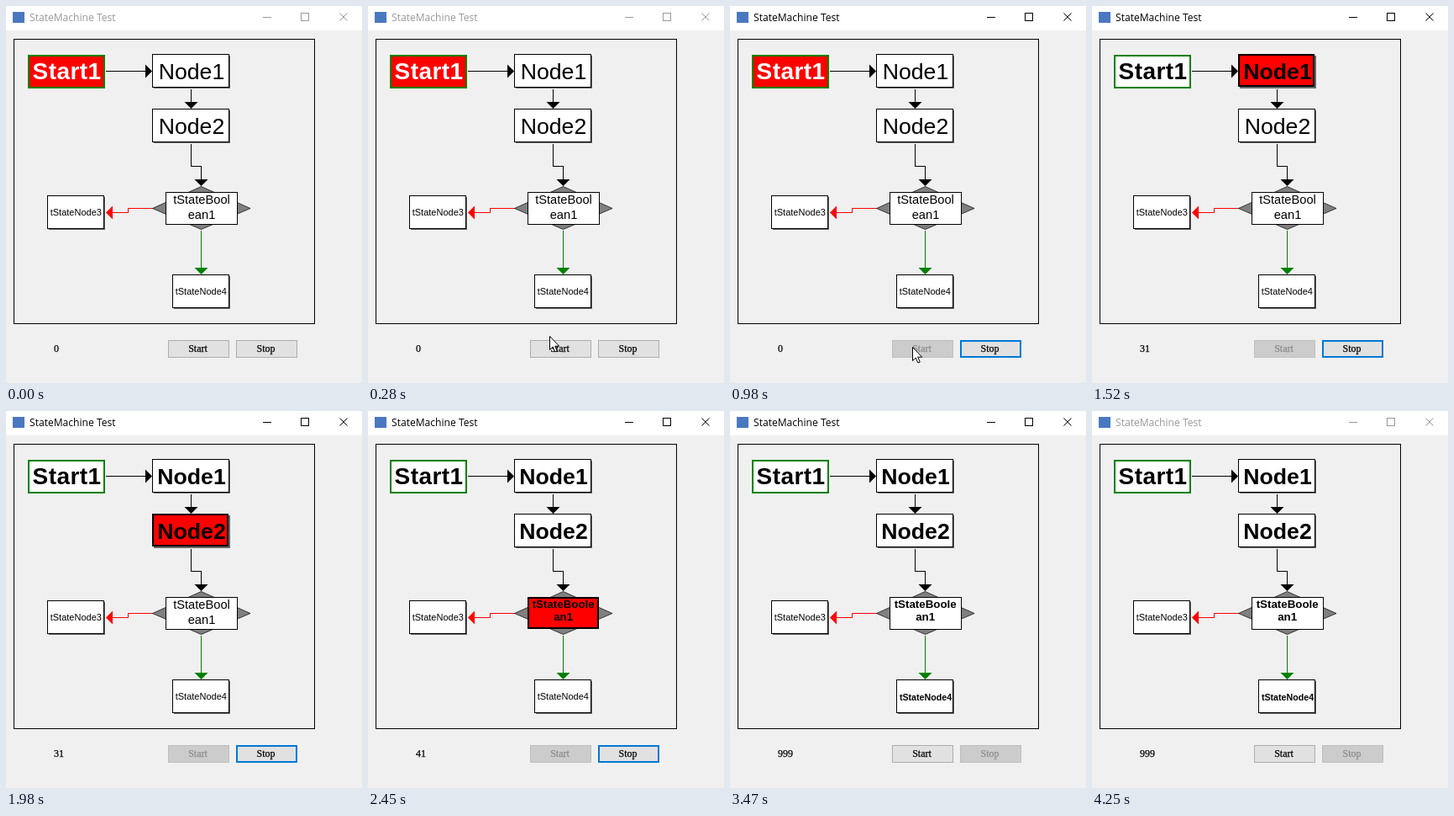
An HTML page that plays this animation: 424x448 px, repeating every 4320 ms.

```html
<!DOCTYPE html>
<html lang="en">
<head>
<meta charset="utf-8">
<title>StateMachine Test</title>
<style>
  html, body { margin: 0; width: 100%; height: 100%; overflow: hidden; background: #f0f0f0; }
  svg { display: block; width: 424px; height: 448px; }
  text { font-family: "Liberation Sans", Arial, sans-serif; text-anchor: middle; }
  .caption { font: 12.1px "Open Sans", "Noto Sans", sans-serif; text-anchor: start; }
  .form { font: 12px "Liberation Serif", "Times New Roman", serif; stroke-width: .25; }
  .start { text-anchor: start; }
</style>
</head>
<body>
<svg id="stage" viewBox="0 0 424 448"></svg>
<script>
const LOOP = 4320;
const stage = document.getElementById('stage');

function add(tag, attrs, content = '') {
  const el = document.createElementNS('http://www.w3.org/2000/svg', tag);
  set(el, attrs);
  el.textContent = content;
  return stage.appendChild(el);
}

function set(el, attrs) {
  for (const key in attrs) el.setAttribute(key, attrs[key]);
}

// Rectangle whose border lies inside the given outer bounds.
function frame(x, y, width, height, border) {
  return { x: x + border / 2, y: y + border / 2, width: width - border, height: height - border, 'stroke-width': border };
}

function arrow(line, head, color) {
  add('path', { d: line, fill: 'none', stroke: color, 'shape-rendering': 'crispEdges' });
  add('path', { d: head, fill: color });
}

function makeNode(x, y, width, height, plain, bold, shadow = true) {
  if (shadow) add('rect', { x: x + 2, y: y + 2, width: width - 1, height: height - 1, fill: '#696969' });
  const box = add('rect', { stroke: '#000' });
  const lines = [add('text', {}), add('text', {})];
  return (active, visited) => {
    const style = visited ? bold : plain;
    const inset = active ? 1 : 0;
    set(box, { ...frame(x, y, width - inset, height - inset, 1 + inset), fill: active ? '#f00' : '#fff' });
    lines.forEach((line, i) => {
      line.textContent = style.lines[i] || '';
      set(line, {
        x: style.x, y: style.y + i * (style.leading || 0),
        'font-size': style.size, 'font-weight': visited ? 700 : 400
      });
    });
  };
}

const buttonLooks = {
  normal: ['#e1e1e1', '#adadad', 1, '#000'],
  warming: ['#e3e9ee', '#5793c2', 1, '#000'],
  hover: ['#e5f1fb', '#0078d7', 1, '#000'],
  pressed: ['#cce4f7', '#005499', 1, '#000'],
  focused: ['#e1e1e1', '#0078d7', 2, '#000'],
  disabled: ['#cccccc', '#bfbfbf', 1, '#8c8c8c']
};

function makeButton(x, label) {
  const box = add('rect', {});
  const text = add('text', { class: 'form', x: x + 35.5, y: 411 }, label);
  return look => {
    const [fill, stroke, border, ink] = buttonLooks[look];
    set(box, { ...frame(x, 397, 73, 21, border), fill, stroke });
    set(text, { fill: ink, stroke: ink });
  };
}

// Window chrome
add('rect', { width: 424, height: 29, fill: '#fff' });
add('rect', { x: 8, y: 7, width: 14, height: 13, fill: '#4a78c0' });
const caption = add('text', { class: 'caption', x: 28, y: 18 }, 'StateMachine Test');
const controls = [
  add('path', { d: 'M306 13.5H316M351.5 8.5H360.5V17.5H351.5Z', fill: 'none', 'shape-rendering': 'crispEdges' }),
  add('path', { d: 'M397.5 8.5L406.5 17.5M406.5 8.5L397.5 17.5', fill: 'none' })
];
add('rect', { ...frame(9, 39, 359, 339, 1), fill: 'none', stroke: '#000' });

// Diagram
arrow('M119 77.5H167', 'M166 69.5V85.5L174 77.5Z', '#000');
arrow('M220.5 99V115', 'M212.5 114H228.5L220.5 122Z', '#000');
arrow('M220.5 164V190.5H232.5V207', 'M224.5 206H240.5L232.5 214Z', '#000');
arrow('M175 240.5H145.5V245.5H126', 'M127 237.5V253.5L119 245.5Z', '#f00');
arrow('M232.5 267V312', 'M224.5 311H240.5L232.5 319Z', '#008000');
add('path', { d: 'M174.5 240.5L232.5 214.5L291 240.5L232.5 265.5Z', fill: '#808080', stroke: '#000', 'stroke-width': .7 });

const startBox = add('rect', { ...frame(26, 58, 92, 40, 2), stroke: '#008000' });
const startText = add('text', { x: 72.5, y: 87, 'font-size': 28, 'font-weight': 700, 'letter-spacing': .4 }, 'Start1');

const bigLabel = (label, y) => ({ lines: [label], x: 221, y, size: 26.67 });
const drawNode1 = makeNode(174, 57, 92, 40, bigLabel('Node1', 87), bigLabel('Node1', 87));
const drawNode2 = makeNode(174, 122, 92, 40, bigLabel('Node2', 152), bigLabel('Node2', 152));
const drawNode3 = makeNode(49, 225, 68, 40, { lines: ['tStateNode3'], x: 83.3, y: 249, size: 11 });
const drawNode4 = makeNode(198, 319, 68, 40,
  { lines: ['tStateNode4'], x: 232.3, y: 343, size: 11 },
  { lines: ['tStateNode4'], x: 233, y: 344, size: 10.67 });
const drawBoolean = makeNode(190, 221, 86, 39,
  { lines: ['tStateBool', 'ean1'], x: 233, y: 235, size: 14.67, leading: 18 },
  { lines: ['tStateBoole', 'an1'], x: 232.7, y: 234, size: 13.33, leading: 15 }, false);

// Form controls
const counter = add('text', { class: 'form start', x: 57, y: 411, stroke: '#000' });
const drawStartButton = makeButton(193, 'Start');
const drawStopButton = makeButton(274, 'Stop');
const cursor = add('path', {
  d: 'M.5 .5V16.5L4.2 13L6.8 19L9.3 18L6.7 12.2H11.7Z', fill: '#fff', stroke: '#000', 'stroke-width': 1
});

// Each track lists [time, value]; a value holds until the next entry.
const tracks = {
  focus: [[0, false], [900, true], [4250, false]],
  step: [[0, 0], [1520, 1], [1980, 2], [2450, 3], [3000, 4], [3470, 5]],
  count: [[0, 0], [1520, 31], [2050, 41], [3000, 999]],
  start: [[0, 'normal'], [600, 'warming'], [670, 'hover'], [900, 'pressed'], [980, 'disabled'], [3470, 'normal']],
  stop: [[0, 'normal'], [980, 'focused'], [3470, 'disabled']],
  cursor: [
    [0, null], [70, [296, 436]], [140, [258, 417]], [210, [230, 400]], [280, [216, 392]],
    [600, [217, 400]], [670, [217, 405]],
    [1210, [226, 402]], [1290, [262, 391]], [1360, [318, 373]], [1440, [374, 354]], [1520, null]
  ]
};

function valueAt(track, time) {
  return track.findLast(([from]) => from <= time)[1];
}

function render(time) {
  const now = {};
  for (const name in tracks) now[name] = valueAt(tracks[name], time);

  set(caption, { fill: now.focus ? '#000' : '#999' });
  controls.forEach(el => set(el, { stroke: now.focus ? '#000' : '#999' }));

  set(startBox, { fill: now.step === 0 ? '#f00' : '#fff' });
  set(startText, { fill: now.step === 0 ? '#fff' : '#000' });
  [drawNode1, drawNode2, drawBoolean, drawNode4].forEach((draw, i) =>
    draw(now.step === i + 1, now.step > i));
  drawNode3(false, false);

  counter.textContent = now.count;
  drawStartButton(now.start);
  drawStopButton(now.stop);
  set(cursor, now.cursor
    ? { visibility: 'visible', transform: `translate(${now.cursor})` }
    : { visibility: 'hidden' });
}

const begin = performance.now();
function tick() {
  render((performance.now() - begin) % LOOP);
  requestAnimationFrame(tick);
}
tick();
</script>
</body>
</html>
```
